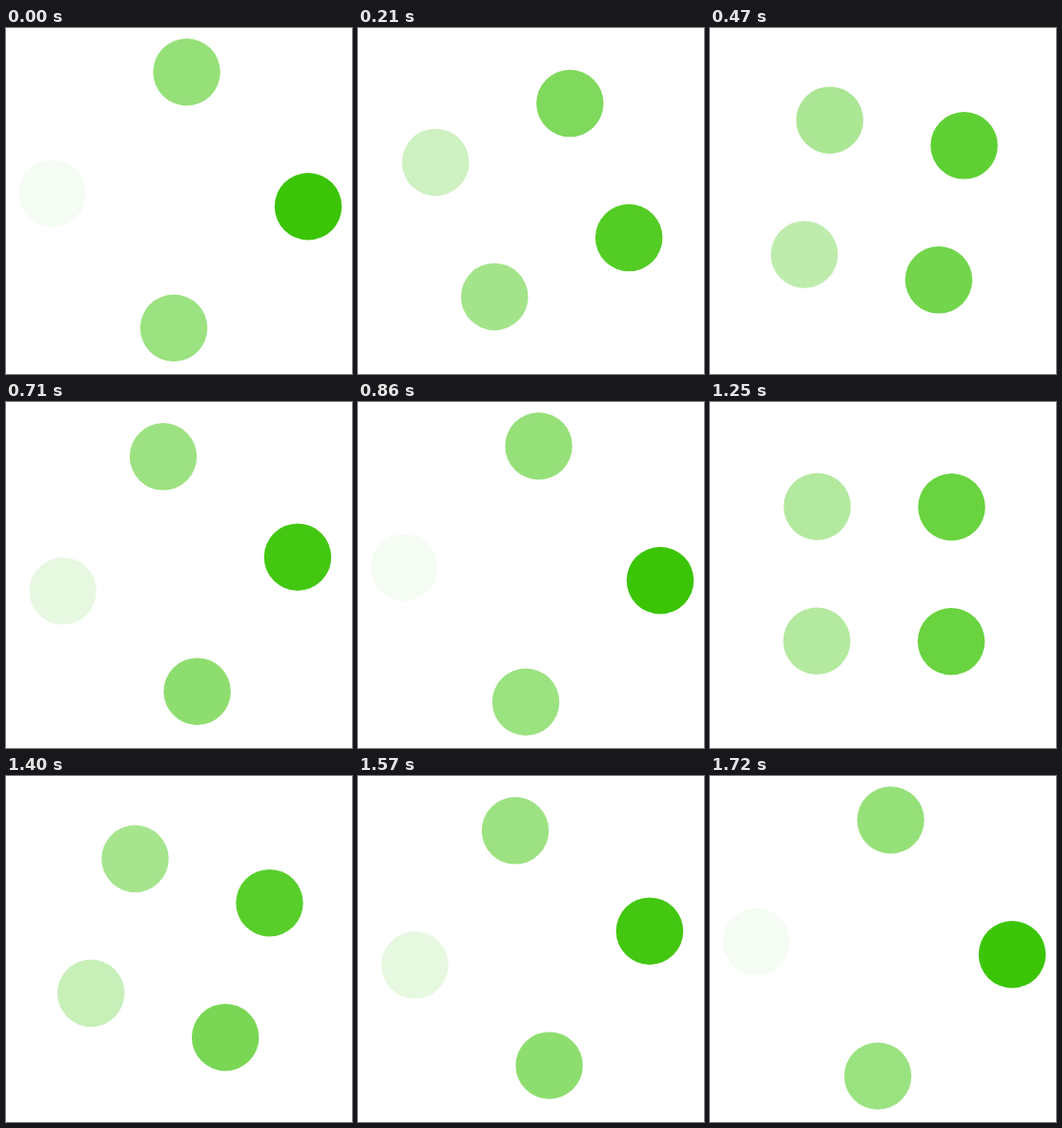
An HTML page with a canvas that plays this animation: 363 by 363 pixels, repeating every 1820 ms.

```html
<!DOCTYPE html>
<html>
<head>
<meta charset="utf-8">
<title>Diamond loader</title>
<style>
  html, body { margin: 0; width: 100%; height: 100%; overflow: hidden; background: #fff; }
  canvas { display: block; }
</style>
</head>
<body>
<canvas id="stage" width="363" height="363"></canvas>
<script>
const ctx = document.getElementById('stage').getContext('2d');
const CX = 182.8, CY = 180.5, REACH = 141, RADIUS = 35.25;
const EDGE = 860, MOVE = 2 * EDGE, LOOP = 1820, START = 0.048;

// How long each step of one edge is held, in units of 10 ms
const holds = [...'33323332333233332332233233223332'].map(d => d * 10);

function snap(time) {
  const base = Math.floor(time / EDGE) * EDGE;
  let start = 0;
  for (const hold of holds) {
    if (base + start + hold > time) break;
    start += hold;
  }
  return base + start;
}

// Clockwise offset on a unit diamond: 0 right, 1 bottom, 2 left, 3 top
const wave = p => Math.abs(((p % 4) + 4) % 4 - 2) - 1;

// Linear fade on the right half; two fades multiply on the left half
function alphaAt(x) {
  if (x >= 0) return 0.5 + x / 2;
  const q = 1 + x;
  return q * (1 - q / 2);
}

function draw(time) {
  const phase = START + snap(time) / EDGE;
  ctx.clearRect(0, 0, 363, 363);
  ctx.fillStyle = '#37c400';
  for (let i = 0; i < 4; i++) {
    const x = wave(phase + i), y = wave(phase + i - 1);
    ctx.globalAlpha = alphaAt(x);
    ctx.beginPath();
    ctx.arc(CX + x * REACH, CY + y * REACH, RADIUS, 0, 2 * Math.PI);
    ctx.fill();
  }
}

const origin = performance.now();
function tick() {
  draw(Math.min((performance.now() - origin) % LOOP, MOVE));
  requestAnimationFrame(tick);
}
tick();
</script>
</body>
</html>
```
